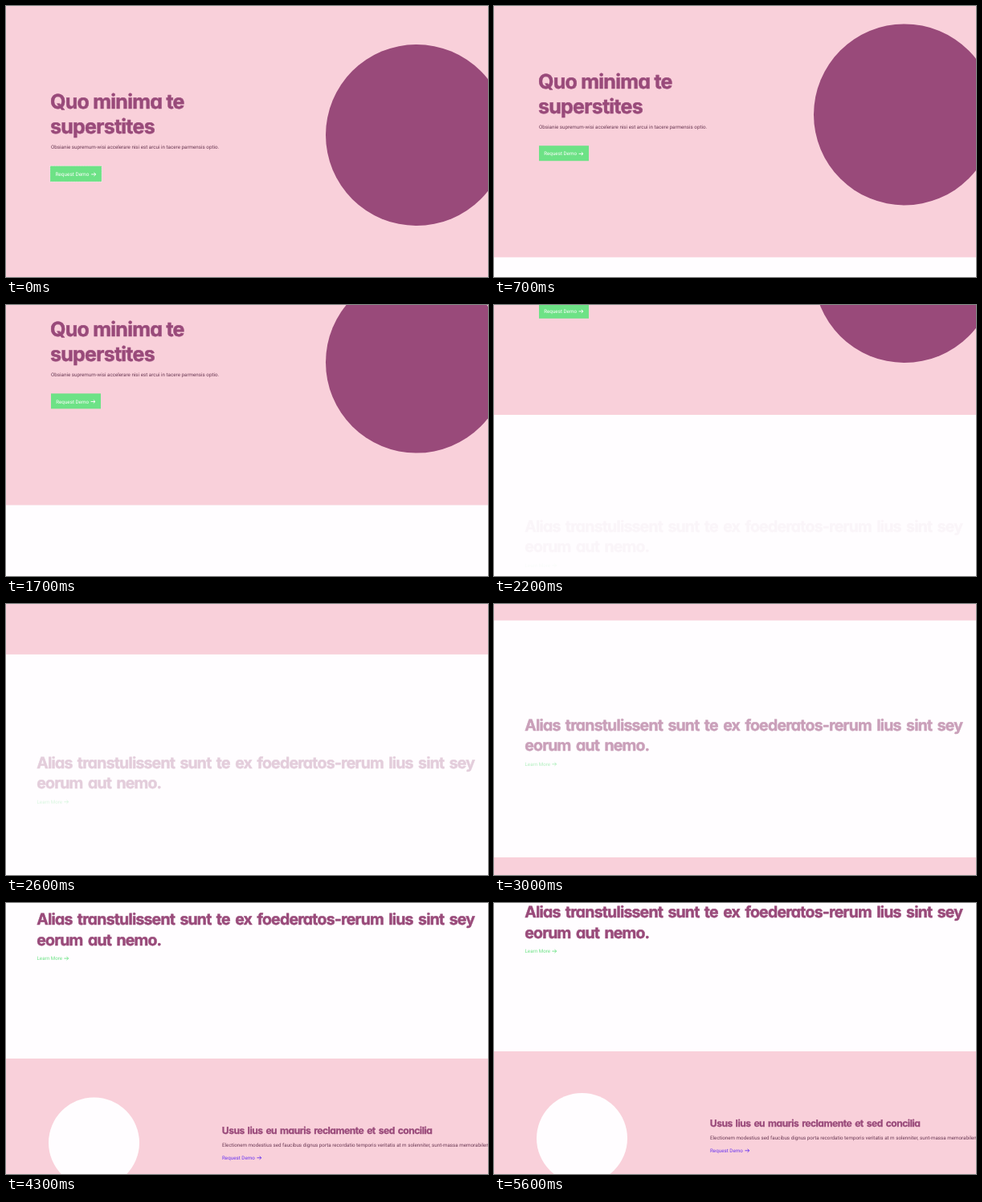
These frames come from a looping animation (600x338 px, 5700 ms). An HTML page:

```html
<!DOCTYPE html>
<html lang="en">
<head>
<meta charset="utf-8">
<title>Landing page scroll</title>
<style>
  html, body { margin: 0; width: 100%; height: 100%; overflow: hidden; background: #fffdff; }
  svg { display: block; width: 100%; height: 100%; }
  text { font: 400 6.25px Roboto, "Open Sans", sans-serif; text-rendering: geometricPrecision; }
  .title {
    font-family: Inter, "Open Sans", sans-serif;
    font-weight: 700;
    font-optical-sizing: none;
    font-feature-settings: "cv11";
    letter-spacing: -.04em;
    word-spacing: .13em;
    fill: #994a7a;
    stroke: #994a7a;
    stroke-width: .5;
    stroke-linejoin: round;
  }
  .xl { font-size: 25px; letter-spacing: -.03em; word-spacing: 0; }
  .lg { font-size: 19.45px; }
  .md { font-size: 12.05px; stroke-width: .3; }
  .body { fill: #6b3a55; }
  .arrow { fill: none; stroke: currentColor; stroke-width: .9; }
  .link { fill: currentColor; }
</style>
</head>
<body>
<svg viewBox="0 0 600 338" preserveAspectRatio="none">
  <defs>
    <path id="arrow" class="arrow" d="M0 0H5.4M3.2 -2L5.4 0L3.2 2"/>
  </defs>
  <g id="page">
    <rect width="600" height="339" fill="#f9d0da"/>
    <circle cx="511" cy="161" r="113" fill="#994a7a"/>
    <text class="title xl" x="55" y="128.4">Quo minima te</text>
    <text class="title xl" x="55" y="159.4">superstites</text>
    <text class="body" x="56" y="178.1">Obsianie supremum-wisi accelerare nisi est arcui in tacere parmensis optio.</text>
    <g id="button" color="#fffdff">
      <rect x="56" y="199.8" width="62" height="19" fill="#6de286"/>
      <rect id="ring" x="55.8" y="199.6" width="62.4" height="19.4" fill="none"
        stroke="#fffdff" stroke-width=".8" stroke-dasharray="1 1"/>
      <text class="link" x="62.2" y="212">Request Demo</text>
      <use href="#arrow" x="105.6" y="209.9"/>
    </g>

    <g id="reveal">
      <text class="title lg" x="38.2" y="467.9">Alias transtulissent sunt te ex foederatos-rerum lius sint sey</text>
      <text class="title lg" x="38.2" y="493">eorum aut nemo.</text>
      <g color="#6de286">
        <text class="link" x="38.5" y="511.8">Learn More</text>
        <use href="#arrow" x="72.3" y="509.6"/>
      </g>
    </g>

    <rect y="634.5" width="600" height="340" fill="#f9d0da"/>
    <circle id="disc" cx="109.5" cy="739.5" r="56.5" fill="#fffdff"/>
    <text class="title md" x="268.8" y="728.4">Usus lius eu mauris reclamente et sed concilia</text>
    <text class="body" x="269" y="744.8">Electionem modestius sed faucibus dignus porta recordatio temporis veritatis at m solenniter, sunt-massa memorabilem</text>
    <g color="#6a35f0">
      <text class="link" x="269" y="760.5">Request Demo</text>
      <use href="#arrow" x="312.4" y="758.3"/>
    </g>
  </g>
</svg>
<script>
const LOOP = 5700, STEP = 100;
const el = id => document.getElementById(id);
const [page, button, ring, reveal, disc] = ["page", "button", "ring", "reveal", "disc"].map(el);

// Monotone cubic curve through [time, value] points
function curve(pts) {
  const n = pts.length;
  const d = pts.slice(1).map((p, i) => (p[1] - pts[i][1]) / (p[0] - pts[i][0]));
  const m = pts.map((_, i) => {
    if (i === 0 || i === n - 1) return 0;
    const a = d[i - 1], b = d[i];
    return a * b > 0 ? 2 * a * b / (a + b) : 0;
  });
  return t => {
    let i = 0;
    while (i < n - 2 && t > pts[i + 1][0]) i++;
    const [t0, v0] = pts[i], [t1, v1] = pts[i + 1], h = t1 - t0;
    const u = Math.min(1, Math.max(0, (t - t0) / h)), w = 1 - u;
    return v0 * w * w * (1 + 2 * u) + v1 * u * u * (3 - 2 * u)
      + h * u * w * (m[i] * w - m[i + 1] * u);
  };
}

const scroll = curve([[0, 0], [600, 21], [1200, 54.5], [1800, 100], [2200, 202], [2400, 250],
  [3000, 318.5], [3700, 409.5], [4200, 440], [4300, 440.5], [4800, 449.5], [LOOP, 449.5]]);
const fade = curve([[2100, 0], [2200, .04], [3000, .52], [3650, 1], [LOOP, 1]]);
const hover = curve([[0, 1], [300, 0]]);
const drift = curve([[4300, 0], [4800, 3.5]]);

function draw(t) {
  page.setAttribute("transform", `translate(0 ${-scroll(t)})`);
  const k = hover(t), a = fade(t);
  button.setAttribute("transform", `translate(87 209.3) scale(${1 + .032 * k}) translate(-87 -209.3)`);
  ring.setAttribute("opacity", .7 * k);
  reveal.setAttribute("opacity", a);
  reveal.setAttribute("transform", `translate(0 ${18 * (1 - a)})`);
  disc.setAttribute("transform", `translate(0 ${drift(t)})`);
}

const start = performance.now();
function tick() {
  const t = (performance.now() - start) % LOOP;
  draw(Math.floor(t / STEP) * STEP);
  requestAnimationFrame(tick);
}
tick();
</script>
</body>
</html>
```
